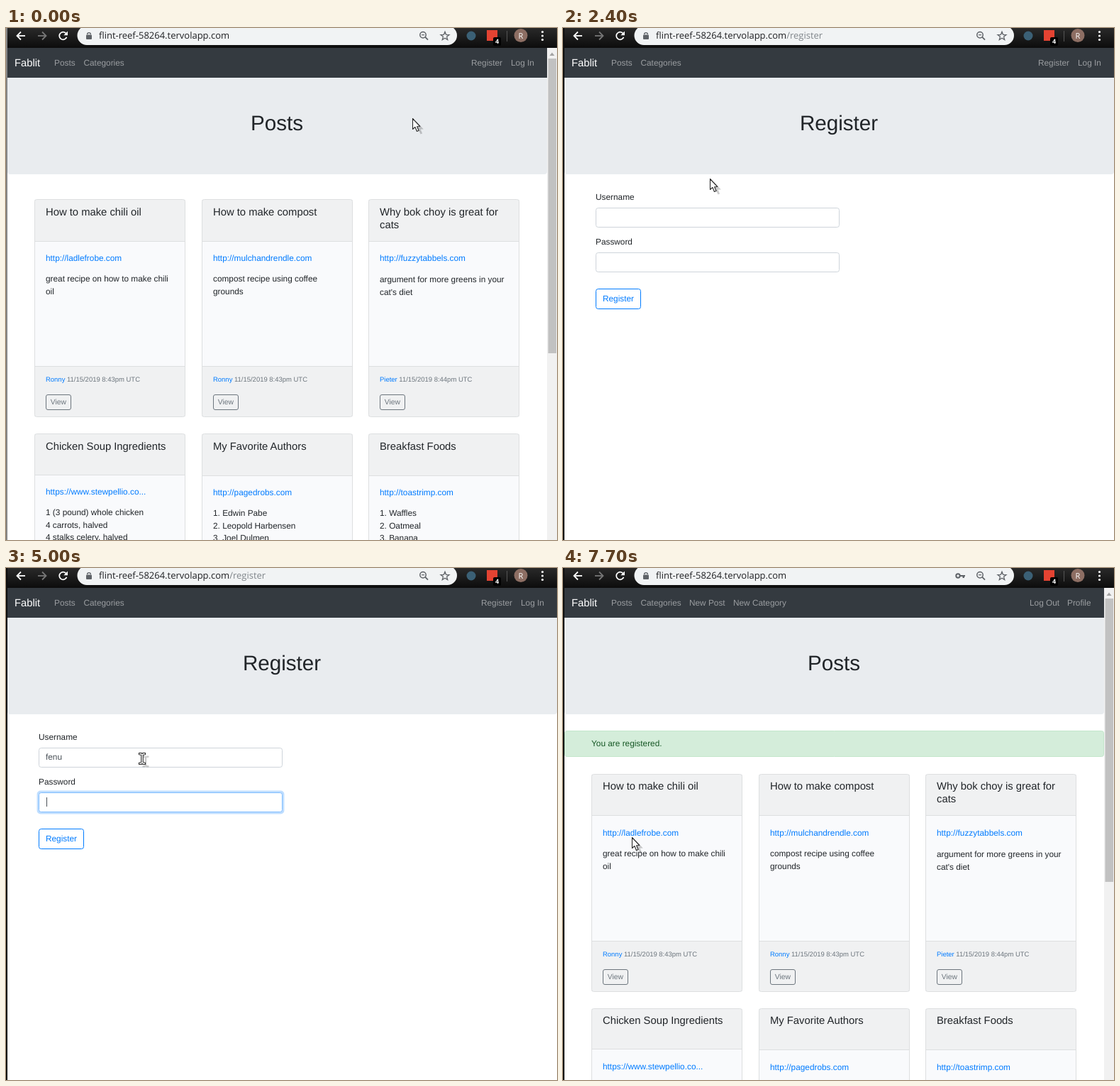
An HTML page with a canvas that plays this animation: 777 by 721 pixels, repeating every 8000 ms.

```html
<!DOCTYPE html>
<html lang="en">
<head>
<meta charset="utf-8">
<title>Sign-up walkthrough</title>
<style>
html, body { margin: 0; width: 777px; height: 721px; overflow: hidden; background: #fff; }
canvas { display: block; }
</style>
</head>
<body>
<canvas id="stage" width="777" height="721"></canvas>
<script>
const ctx = document.getElementById('stage').getContext('2d');
ctx.textRendering = 'geometricPrecision';
const W = 777, H = 721, LOOP = 8000;
const SANS = '"Liberation Sans", Arial, sans-serif';
const UI = '"Open Sans", "Noto Sans", sans-serif';
const INK = '#212529', BLUE = '#007bff', MUTED = '#6c757d', ICON = '#5f6368';
const HOST = 'flint-reef-58264.tervolapp.com';

// Type sizes of the zoomed page, relative to its body text
const BASE = 11.84;
const TITLE = BASE * 2.5, LARGE = BASE * 1.25, SMALL = BASE * 0.8, BUTTON = BASE * 0.875;

const cards = [
  { title: ['How to make chili oil'], link: 'http://ladlefrobe.com',
    body: ['great recipe on how to make chili', 'oil'], by: 'Ronny', time: '8:43pm' },
  { title: ['How to make compost'], link: 'http://mulchandrendle.com',
    body: ['compost recipe using coffee', 'grounds'], by: 'Ronny', time: '8:43pm' },
  { title: ['Why bok choy is great for', 'cats'], link: 'http://fuzzytabbels.com',
    body: ['argument for more greens in your', "cat's diet"], by: 'Pieter', time: '8:44pm', dy: 1 },
  { title: ['Chicken Soup Ingredients'], link: 'https://www.stewpellio.co...',
    body: ['1 (3 pound) whole chicken', '4 carrots, halved', '4 stalks celery, halved'] },
  { title: ['My Favorite Authors'], link: 'http://pagedrobs.com',
    body: ['1. Edwin Pabe', '2. Leopold Harbensen', '3. Joel Dulmen'], dy: 1 },
  { title: ['Breakfast Foods'], link: 'http://toastrimp.com',
    body: ['1. Waffles', '2. Oatmeal', '3. Banana'], dy: 1 }
];

// Pointer path: time, x, y, shape
const path = [
  [0, 573, 127, 'arrow'], [600, 573, 127, 'arrow'], [700, 579, 122, 'arrow'],
  [1000, 657, 62, 'arrow'], [1100, 672, 49, 'hand'], [1200, 677, 45, 'hand'],
  [1300, 678, 46, 'hand'], [1400, 640, 57, 'arrow'], [1500, 555, 88, 'arrow'],
  [1700, 285, 186, 'arrow'], [1800, 207, 212, 'arrow'], [3000, 207, 212, 'arrow'],
  [3100, 199, 235, 'arrow'], [3200, 189, 258, 'beam'], [3300, 187, 260, 'beam'],
  [6100, 187, 260, 'beam'], [6300, 186, 262, 'beam'], [6400, 186, 262, 'beam'],
  [6500, 172, 354, 'arrow'], [6600, 125, 368, 'arrow'], [6700, 97, 379, 'hand'],
  [7200, 97, 379, 'arrow'], [LOOP, 97, 379, 'arrow']
];

const within = (t, a, b) => t >= a && t < b;
const passed = (t, times) => times.filter(v => t >= v).length;

function text(str, x, y, size, color, font = SANS, align = 'left', weight = 400) {
  ctx.font = `${weight} ${size}px ${font}`;
  ctx.fillStyle = color;
  ctx.textAlign = align;
  ctx.fillText(str, x, y);
  return ctx.measureText(str).width;
}

function rect(x, y, w, h, color) {
  ctx.fillStyle = color;
  ctx.fillRect(x, y, w, h);
}

function round(x, y, w, h, r, fill, stroke, width = 1) {
  const o = stroke ? 0.5 : 0;
  ctx.beginPath();
  ctx.roundRect(x + o, y + o, w - 2 * o, h - 2 * o, r);
  if (fill) { ctx.fillStyle = fill; ctx.fill(); }
  if (stroke) { ctx.strokeStyle = stroke; ctx.lineWidth = width; ctx.stroke(); }
}

function disc(x, y, r, color) {
  ctx.beginPath();
  ctx.arc(x, y, r, 0, 7);
  ctx.fillStyle = color;
  ctx.fill();
}

function ring(x, y, r, color, width, from = 0, to = Math.PI * 2) {
  ctx.beginPath();
  ctx.arc(x, y, r, from, to);
  ctx.strokeStyle = color;
  ctx.lineWidth = width;
  ctx.stroke();
}

function trace(points, close) {
  ctx.beginPath();
  points.forEach(([x, y]) => ctx.lineTo(x, y));
  if (close) ctx.closePath();
}

function line(points, color, width, close) {
  trace(points, close);
  ctx.strokeStyle = color;
  ctx.lineWidth = width;
  ctx.stroke();
}

function shape(points, color) {
  trace(points, true);
  ctx.fillStyle = color;
  ctx.fill();
}

function navArrow(x, dir, color) {
  line([[x - 6 * dir, 11], [x + 5 * dir, 11]], color, 1.8);
  line([[x, 5.5], [x + 5.5 * dir, 11], [x, 16.5]], color, 1.8);
}

function toolbar(t) {
  const g = ctx.createLinearGradient(0, 0, 0, 28);
  g.addColorStop(0, '#292929');
  g.addColorStop(1, '#0c0c0c');
  rect(0, 0, W, 28, g);

  navArrow(21, -1, '#fff');
  navArrow(51, 1, '#777');
  if (within(t, 1600, 2400) || within(t, 7200, 7700)) {
    line([[76, 6], [86, 16]], '#fff', 1.9);
    line([[86, 6], [76, 16]], '#fff', 1.9);
  } else {
    ring(80.5, 11, 5.3, '#fff', 1.8, 0.35, 5.5);
    shape([[87, 4.5], [87, 10.2], [81.3, 10.2]], '#fff');
  }

  round(100.5, -3, 535.5, 27, 13.5, '#f1f3f4');
  round(113, 9.5, 8, 6.5, 1, ICON);
  ring(117, 9, 2.4, ICON, 1.4, Math.PI, 0);
  const w = text(HOST, 131, 15, 13, '#202124', UI);
  if (within(t, 2400, 7700)) text('/register', 131 + w, 15, 13, '#80868b', UI);

  if (t >= 5300) {
    ring(557, 11, 2.7, ICON, 2);
    rect(560, 10, 7, 2, ICON);
    rect(563.5, 11, 2.5, 3, ICON);
  }
  ring(588, 9.7, 4.2, ICON, 1.5);
  line([[591, 12.7], [595, 16.7]], ICON, 1.8);
  line([[586, 9.7], [590, 9.7]], ICON, 1.2);
  const star = Array.from({ length: 10 }, (_, i) => {
    const a = i * Math.PI / 5 - Math.PI / 2, r = i % 2 ? 2.7 : 6.3;
    return [619 + r * Math.cos(a), 11.5 + r * Math.sin(a)];
  });
  line(star, ICON, 1.3, true);

  disc(656, 11, 6.5, '#3b6075');
  rect(678, 3, 15, 15, '#e44332');
  round(687, 13, 11, 12, 2, '#000');
  text('4', 692.5, 22, 9, '#fff', UI, 'center', 700);
  rect(706, 4, 1, 15, '#555');
  disc(726, 10.5, 9.5, '#8d6e63');
  text('R', 726, 15, 11, '#fff', UI, 'center');
  [5.5, 11, 16.5].forEach(y => disc(756.5, y, 1.6, '#fff'));
}

function header(title, right, left, links, active) {
  rect(0, 28, right, 42, '#343a40');
  text('Fablit', 12, 54, LARGE, '#fff');
  const dim = 'rgba(255,255,255,.5)', lit = 'rgba(255,255,255,.75)';
  left.concat(links).forEach(([label, x]) =>
    text(label, x, 53, BASE, label === active ? lit : dim));
  ctx.beginPath();
  ctx.roundRect(2, 70, right - 2, 136, [0, 0, 4, 4]);
  ctx.fillStyle = '#e9ecef';
  ctx.fill();
  text(title, (right + 1) / 2, 144, TITLE, INK, SANS, 'center');
}

function scrollbar(end) {
  rect(763, 28, 14, H - 28, '#f1f1f1');
  shape([[766.5, 39], [770, 34.5], [773.5, 39]], '#a3a3a3');
  rect(764.5, 43, 11.5, end - 43, '#c1c1c1');
}

function card(c, i, shift) {
  const x = [40, 276, 511][i % 3], row = Math.floor(i / 3);
  const y = 241 + row * 330 + shift, dy = c.dy || 0;
  const head = y + (row ? 58 + dy : 59) - (shift ? 1 : 0);
  const edge = '#dddfe0', band = '#f0f1f2', tx = x + 16;
  round(x, y, 213, 307, 3, '#f9fafc');
  rect(x, y + 1, 213, head - y, band);
  rect(x, head, 213, 1, edge);
  rect(x, y + 235, 213, 71, band);
  rect(x, y + 235, 213, 1, edge);
  round(x, y, 213, 307, 3, null, edge);

  const ty = y + 23 - (shift ? 1 : 0);
  c.title.forEach((s, k) => text(s, tx, ty + k * 18, LARGE, INK));
  text(c.link, tx, y + (row ? 86 + dy : 87), BASE, BLUE);
  c.body.forEach((s, k) => text(s, tx, y + (row ? 115 : 116) + dy + Math.round(k * 17.6), BASE, INK));
  if (row) return;
  const w = text(c.by, tx, y + 257, SMALL, BLUE);
  text(' 11/15/2019 ' + c.time + ' UTC', tx + w, y + 257, SMALL, MUTED);
  round(tx, y + 275, 36, 22, 2.5, null, MUTED);
  text('View', tx + 17.8, y + 289, BUTTON, MUTED, SANS, 'center');
}

function postsPage(t) {
  const member = t >= 7700, left = [['Posts', 68], ['Categories', 109.5]];
  if (member) {
    header('Posts', 763, left.concat([['New Post', 178], ['New Category', 240]]),
      [['Log Out', 658], ['Profile', 711]]);
    round(2, 229, 761, 37, 3, '#d4edda', '#c3e6cb');
    text('You are registered.', 40, 251, BASE, '#155724');
  } else {
    header('Posts', 763, left, [['Register', 656], ['Log In', 712]], t >= 1100 ? 'Register' : '');
  }
  cards.forEach((c, i) => card(c, i, member ? 49 : 0));
  scrollbar(member ? 442 : 458);
}

function field(label, y, value, focus, caret) {
  text(label, 46, y - 11, BASE, INK);
  if (focus) round(43.6, y - 2.4, 348.8, 32.8, 5, `rgba(0,123,255,${0.25 * focus})`);
  round(46, y, 344, 28, 3, '#fff', focus > 0.5 ? '#80bdff' : '#ced4da');
  const w = text(value, 56, y + 17, BASE, '#495057');
  if (caret) rect(Math.round(56 + w) + (value ? 0 : 1), y + 7, 1, 13, '#495057');
}

function registerPage(t) {
  header('Register', W, [['Posts', 68], ['Categories', 109.5]], [['Register', 670], ['Log In', 726]]);
  const name = 'fenu'.slice(0, passed(t, [4000, 4100, 4300, 4400]));
  const dots = '•'.repeat(passed(t, [5300, 5400, 5500, 5700, 5700]));
  const nameFocus = within(t, 3200, 5000) ? (t < 3300 ? 0.5 : t < 4900 ? 1 : 0.4) : 0;
  const passFocus = within(t, 4900, 7200) ? (t < 5000 ? 0.6 : 1) : 0;
  field('Username', 253, name, nameFocus, within(t, 3300, 3900) || within(t, 4000, 4900));
  field('Password', 316, dots, passFocus, within(t, 4900, 6200) || within(t, 6700, 6900));

  const fill = within(t, 6700, 7200) ? (t < 6900 ? 0.6 : 1) : 0;
  ctx.globalAlpha = t >= 7200 ? 0.65 : 1;
  round(46, 367, 64, 29, 3, `rgba(0,123,255,${fill})`, BLUE);
  text('Register', 56, 385, BASE, fill ? '#fff' : BLUE);
  ctx.globalAlpha = 1;
}

const arrow = [[0, 0], [0, 15], [3.4, 12], [6, 18], [8.6, 17], [6.1, 11.3], [10.3, 11]];
const hand = [[-1, 0], [1, 0], [1.3, 4], [6, 5], [7, 7], [5.6, 11.5], [-2.5, 11.5],
  [-6, 7], [-5, 5.5], [-2, 7]];
const beam = [[0, 0], [3.4, 0], [4.5, 1], [5.6, 0], [9, 0], [9, 2.2], [5.8, 2.8], [5.8, 13.2],
  [9, 13.8], [9, 16], [5.6, 16], [4.5, 15], [3.4, 16], [0, 16], [0, 13.8], [3.2, 13.2],
  [3.2, 2.8], [0, 2.2]];
const pointers = { arrow, hand, beam };

function pointer(t) {
  const i = path.findIndex((p, k) => t < path[k + 1][0]);
  const [t0, x0, y0, kind] = path[i], [t1, x1, y1] = path[i + 1];
  const k = (t - t0) / (t1 - t0), points = pointers[kind];
  ctx.save();
  ctx.lineJoin = 'round';
  ctx.translate(x0 + (x1 - x0) * k + 0.5, y0 + (y1 - y0) * k + 0.5);
  ctx.translate(5, 4);
  shape(points, 'rgba(0,0,0,.2)');
  ctx.translate(-5, -4);
  shape(points, '#fff');
  line(points, '#2b2b2b', 1.1, true);
  ctx.restore();
}

function draw(now) {
  const t = Math.floor((now % LOOP) / 100) * 100; // the screen updates ten times a second
  rect(0, 0, W, H, '#fff');
  if (within(t, 2400, 7700)) registerPage(t);
  else postsPage(t);
  toolbar(t);
  rect(0, 0, 2, H, t < 700 ? '#858585' : '#0c0c0c');
  pointer(t);
}

let start;
function tick(now) {
  if (start === undefined) start = now;
  draw(now - start);
  requestAnimationFrame(tick);
}
requestAnimationFrame(tick);
</script>
</body>
</html>
```
